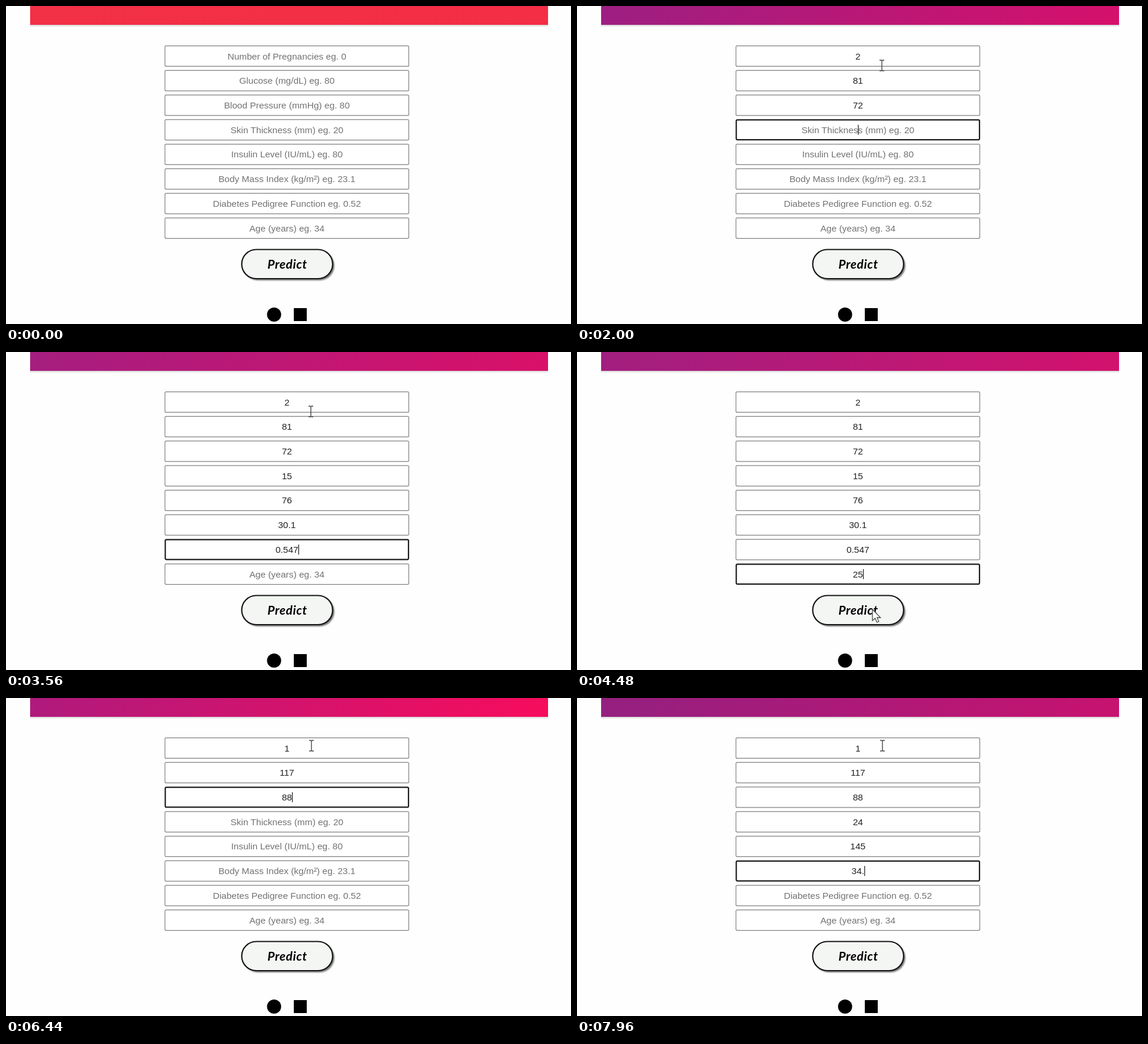
These frames come from a looping animation (960x540 px, 8 s). An HTML page:

```html
<!DOCTYPE html>
<html lang="en">
<head>
<meta charset="utf-8">
<title>Diabetes prediction form</title>
<style>
  html, body { margin: 0; width: 100%; height: 100%; overflow: hidden; background: #fefefe; }
  svg { display: block; width: 100vw; height: 100vh; }
  text { font-family: "Liberation Sans", Arial, sans-serif; text-anchor: middle; }
  .field text { font-size: 15.5px; }
  .result text { font-size: 37px; font-weight: bold; }
  .predict { font: italic bold 21px Lato, sans-serif; letter-spacing: .6px; }
</style>
</head>
<body>
<svg id="stage" viewBox="0 0 960 540">
  <defs>
    <linearGradient id="sweep" gradientUnits="userSpaceOnUse" x1="41" y1="0" x2="497" y2="456">
      <stop id="near" offset="0"/><stop id="far" offset="1"/>
    </linearGradient>
    <linearGradient id="shade" x1="0" y1="0" x2="0" y2="1">
      <stop offset="0" stop-color="#000" stop-opacity=".16"/>
      <stop offset="1" stop-color="#000" stop-opacity="0"/>
    </linearGradient>
    <filter id="soft" x="-10%" y="-20%" width="120%" height="150%"><feGaussianBlur stdDeviation=".8"/></filter>
  </defs>
  <rect width="960" height="540" fill="#fefefe"/>
  <rect x="41" y="32" width="880" height="4" fill="url(#shade)"/>
  <rect x="41" width="880" height="32" fill="url(#sweep)"/>
  <g id="form">
    <g id="fields"></g>
    <rect x="403" y="416" width="155" height="50" rx="25" fill="#777" filter="url(#soft)"/>
    <rect x="400.5" y="413.5" width="154.5" height="49.5" rx="24.7" fill="#f4f6f4" stroke="#151515" stroke-width="2.2"/>
    <text class="predict" x="478" y="446">Predict</text>
    <circle cx="455.5" cy="524" r="12"/>
    <rect x="489" y="513" width="22" height="22"/>
  </g>
  <g id="result" class="result">
    <text x="477" y="125">Prediction:</text>
    <text x="477.5" y="193.5" fill="#1a7a1c">Great! You DON'T have diabetes.</text>
    <path d="M82 302.5H878" stroke="#f1f1f1"/>
  </g>
  <path id="beam" d="M-4 -9H-1L0 -8L1 -9H4M0 -8V8M-4 9H-1L0 8L1 9H4" fill="none" stroke="#444" stroke-width="1.4"/>
  <path id="arrow" d="M0 0V19L4.5 15L7.6 22L10.8 20.6L7.8 14H13.6Z" fill="#fff" stroke="#444" stroke-width="1.3"/>
</svg>
<script>
const LOOP = 8000, RESULT_AT = 4720, BACK_AT = 5560;
const $ = id => document.getElementById(id);

const hints = [
  "Number of Pregnancies eg. 0", "Glucose (mg/dL) eg. 80", "Blood Pressure (mmHg) eg. 80",
  "Skin Thickness (mm) eg. 20", "Insulin Level (IU/mL) eg. 80", "Body Mass Index (kg/m²) eg. 23.1",
  "Diabetes Pedigree Function eg. 0.52", "Age (years) eg. 34"
];

// Per field: focus time, first key, key interval, value
const firstRun = [
  [420, 600, 80, "2"], [740, 960, 120, "81"], [1240, 1480, 120, "72"], [1840, 2080, 100, "15"],
  [2320, 2420, 100, "76"], [2640, 2720, 80, "30.1"], [3060, 3140, 80, "0.547"], [3720, 3840, 100, "25"]
];
const secondRun = [
  [5760, 5860, 60, "1"], [5920, 5980, 60, "117"], [6180, 6260, 80, "88"],
  [6600, 6740, 100, "24"], [7000, 7120, 100, "145"], [7460, 7600, 120, "34."]
];

// Header colours: time, left rgb, right rgb
const tints = [
  [0, 242, 48, 70, 244, 46, 68], [800, 245, 18, 96, 242, 28, 80],
  [2000, 156, 31, 130, 214, 16, 107], [3560, 164, 30, 128, 218, 16, 105],
  [5360, 157, 31, 128, 205, 20, 112], [6440, 174, 26, 125, 248, 12, 92],
  [7960, 147, 32, 128, 200, 18, 111]
];

// Pointer: time, x, y
const pointer = [
  [160, 560, 220], [400, 524, 94.5], [1000, 524, 94.5], [1200, 518, 101], [4040, 518, 101],
  [4460, 502, 437], [5560, 502, 437], [5740, 519, 81]
];

function make(tag, attrs, parent) {
  const el = document.createElementNS("http://www.w3.org/2000/svg", tag);
  set(el, attrs);
  return parent.appendChild(el);
}

function set(el, attrs) {
  for (const k in attrs) el.setAttribute(k, attrs[k]);
}

function sample(keys, t, ease = k => k) {
  if (t <= keys[0][0]) return keys[0].slice(1);
  const i = keys.findIndex(k => k[0] > t);
  if (i < 0) return keys[keys.length - 1].slice(1);
  const a = keys[i - 1], b = keys[i], k = ease((t - a[0]) / (b[0] - a[0]));
  return a.slice(1).map((v, j) => v + (b[j + 1] - v) * k);
}

const smooth = k => k * k * (3 - 2 * k);
const show = (el, on) => el.setAttribute("visibility", on ? "inherit" : "hidden");
const rgb = c => `rgb(${c.map(Math.round)})`;

const fields = hints.map((hint, i) => {
  const y = 67 + i * 41.74;
  const g = make("g", { class: "field" }, $("fields"));
  const box = make("rect", { rx: 2, fill: "#fff" }, g);
  const label = make("text", { x: 477.3, y: y + 23.5 }, g);
  const caret = make("rect", { y: y + 9.5, width: 1.3, height: 17, fill: "#222" }, g);
  return { hint, y, box, label, caret };
});

// The border grows inwards from a fixed outer edge
function drawBorder(f, on) {
  const w = on ? 2.2 : 1.2;
  set(f.box, {
    x: 269.5 + w / 2, y: f.y + w / 2, width: 415.5 - w, height: 36 - w,
    stroke: on ? "#1c1c1c" : "#808080", "stroke-width": w
  });
}

function drawFields(t) {
  const run = t < BACK_AT ? firstRun : secondRun;
  const active = run.filter(r => t >= r[0]).length - 1;
  fields.forEach((f, i) => {
    const [, start, step, value] = run[i] || [0, Infinity, 1, ""];
    const count = t < start ? 0 : Math.floor((t - start) / step) + 1;
    const typed = value.slice(0, count), on = i === active;
    const text = typed || f.hint;
    if (f.label.textContent !== text) f.label.textContent = text;
    f.label.setAttribute("fill", typed ? "#222" : "#727272");
    drawBorder(f, on);
    show(f.caret, on);
    if (on) f.caret.setAttribute("x", 477.3 + (typed ? f.label.getComputedTextLength() / 2 : 0));
  });
}

function draw(t) {
  const c = sample(tints, t);
  $("near").setAttribute("stop-color", rgb(c.slice(0, 3)));
  $("far").setAttribute("stop-color", rgb(c.slice(3)));

  const done = t >= RESULT_AT && t < BACK_AT;
  show($("form"), !done);
  show($("result"), done);
  drawFields(t);

  const [x, y] = sample(pointer, t, smooth);
  const isArrow = done || y > 395;
  for (const id of ["beam", "arrow"]) {
    $(id).setAttribute("transform", `translate(${x} ${y})`);
    show($(id), t >= 160 && isArrow === (id === "arrow"));
  }
}

const begin = performance.now();
function tick() {
  draw((performance.now() - begin) % LOOP);
  requestAnimationFrame(tick);
}
tick();
</script>
</body>
</html>
```
